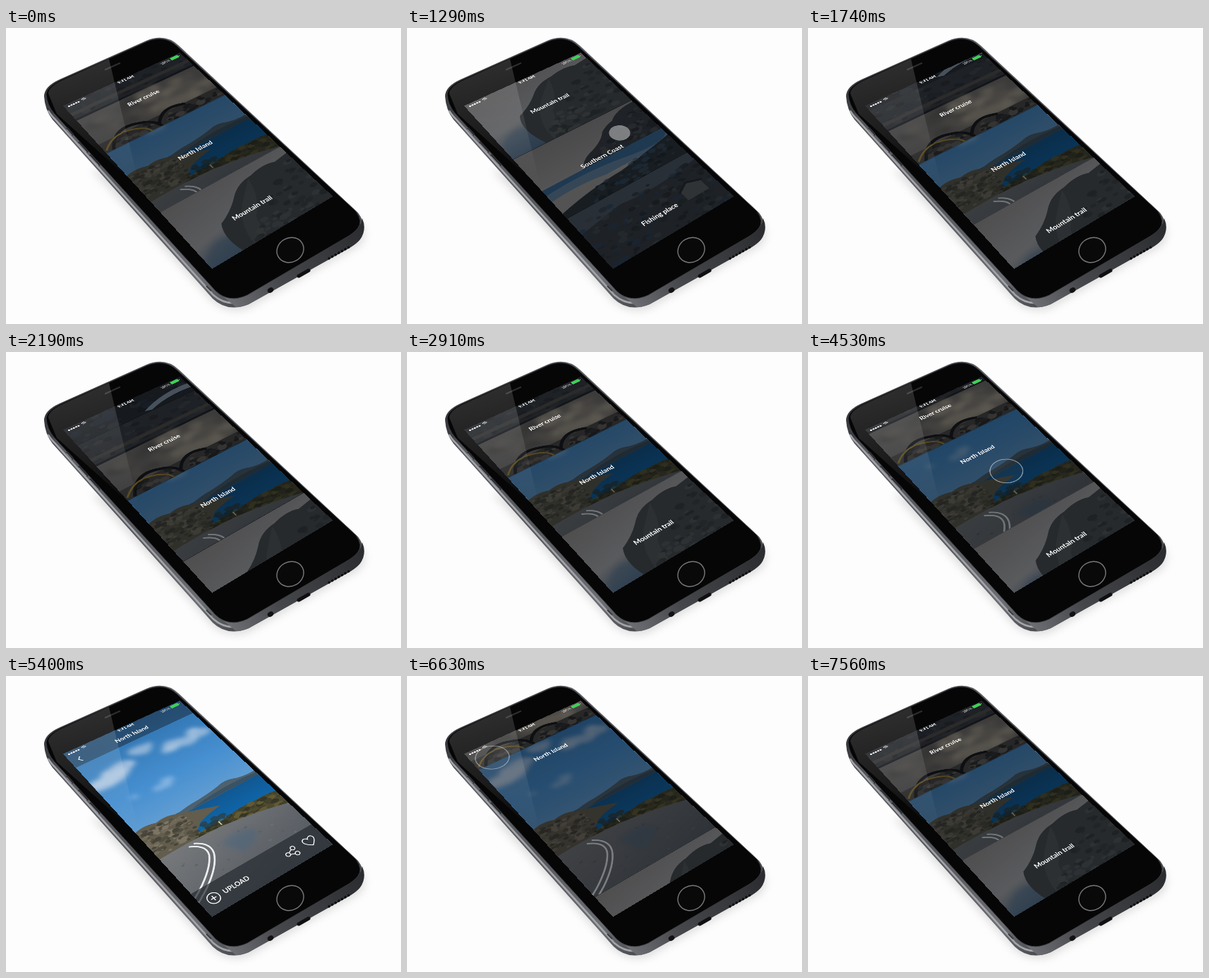
An HTML page that plays this animation: 560x420 px, repeating every 7.59 s.

```html
<!DOCTYPE html>
<html lang="en">
<head>
<meta charset="utf-8">
<title>Travel list</title>
<style>
html, body { margin: 0; width: 100%; height: 100%; overflow: hidden; background: #fdfdfd; }
#stage { position: relative; width: 560px; height: 420px; overflow: hidden; }
#stage > svg { position: absolute; left: 0; top: 0; }
#screen { position: absolute; left: 0; top: 0; width: 375px; height: 667px; overflow: hidden; background: #16191c; transform-origin: 0 0; }
#screen > svg { display: block; }
text { font-family: Lato, "Open Sans", sans-serif; fill: #fff; }
.label { font-weight: 700; font-size: 19px; text-anchor: middle; }
</style>
</head>
<body>
<div id="stage">
  <svg width="560" height="420" viewBox="0 0 560 420">
    <defs>
      <linearGradient id="rim" x1="55" y1="100" x2="320" y2="395" gradientUnits="userSpaceOnUse">
        <stop offset="0" stop-color="#38393d"/><stop offset=".15" stop-color="#5c5e63"/>
        <stop offset=".5" stop-color="#56585c"/><stop offset=".85" stop-color="#6b6d72"/><stop offset="1" stop-color="#4c4e52"/>
      </linearGradient>
      <linearGradient id="foot" x1="320" y1="395" x2="508" y2="285" gradientUnits="userSpaceOnUse">
        <stop offset="0" stop-color="#6c6e73"/><stop offset=".35" stop-color="#45474b"/><stop offset="1" stop-color="#2b2c2f"/>
      </linearGradient>
      <filter id="soft" x="-20%" y="-20%" width="140%" height="140%"><feGaussianBlur stdDeviation="6"/></filter>
    </defs>
    <rect width="560" height="420" fill="#fdfdfd"/>
    <path d="M120 200 L292 388 Q312 406 342 399 L500 310 Q516 296 503 275 Z" fill="#999" opacity=".3" filter="url(#soft)"/>
    <path d="M54 97 Q54 83 76 73 L199 18 Q226 7 245 25 L499 262 Q512 279 504 297 Q499 305 487 312 L344 392 Q314 404 293 384 L66 130 Q55 116 54 97 Z" fill="url(#rim)"/>
    <path d="M60 117 Q62 122 69 129 L294 379 Q313 396 340 387" fill="none" stroke="#a2a4a9" stroke-width="2.6"/>
    <path d="M297 372 Q318 386 344 376 L492 290 Q504 282 505 270 Q512 286 502 300 Q497 306 487 312 L344 392 Q334 396 326 396 Z" fill="url(#foot)"/>
    <path d="M57 94 Q57 84 77 74 L200 19 Q225 9 243 26 L496 260 Q507 275 498 285 Q494 290 486 295 L342 379 Q316 391 297 373 L68 121 Q58 109 57 94 Z" fill="#060607" stroke="#3c3d41" stroke-width=".8"/>
    <path d="M58 112 L66 121 M284 366 L291 373" stroke="#3a3b3f" stroke-width="2"/>
    <path d="M87 143 L94 151 M104 163 L115 175 M120 181 L132 194" stroke="#303136" stroke-width="3.6" stroke-linecap="round"/>
    <path d="M86 144 L93 152 M103 164 L114 176 M119 182 L131 195" stroke="#a4a6aa" stroke-width="1" stroke-linecap="round"/>
    <path d="M141 59 L161 50" stroke="#2d2d30" stroke-width="2.4" stroke-linecap="round"/>
    <ellipse cx="403" cy="315" rx="19.500" ry="17.200" transform="rotate(-28 403 315)" fill="#090909" stroke="#77787b" stroke-width="1.4"/>
    <ellipse cx="375" cy="372" rx="4.500" ry="3.500" transform="rotate(-30 375 372)" fill="#121214"/>
    <path d="M415 352 L429 344" stroke="#101012" stroke-width="5" stroke-linecap="round"/>
    <path d="M458 327 L486 311" stroke="#0c0c0d" stroke-width="3.4" stroke-linecap="round" stroke-dasharray=".1 5.2"/>
  </svg>

  <div id="screen">
    <svg width="375" height="667" viewBox="0 0 375 667">
      <defs>
        <linearGradient id="sky" x1="0" y1="0" x2="0" y2="1">
          <stop offset="0" stop-color="#2f72ae"/><stop offset=".5" stop-color="#468fd0"/><stop offset="1" stop-color="#78a9d4"/>
        </linearGradient>
        <linearGradient id="sea" x1="0" y1="0" x2="0" y2="1">
          <stop offset="0" stop-color="#12568f"/><stop offset="1" stop-color="#0d6ab0"/>
        </linearGradient>
        <linearGradient id="road" x1="0" y1="0" x2=".5" y2="1">
          <stop offset="0" stop-color="#77797b"/><stop offset="1" stop-color="#565b62"/>
        </linearGradient>
        <linearGradient id="fog" x1="0" y1="0" x2=".3" y2="1">
          <stop offset="0" stop-color="#8d8a88"/><stop offset=".55" stop-color="#a0a1a2"/><stop offset="1" stop-color="#41607c"/>
        </linearGradient>
        <linearGradient id="dusk" x1="0" y1="0" x2="0" y2="1">
          <stop offset="0" stop-color="#848180"/><stop offset="1" stop-color="#a7a3a1"/>
        </linearGradient>
        <filter id="blur" x="-30%" y="-30%" width="160%" height="160%"><feGaussianBlur stdDeviation="8"/></filter>
      </defs>
      <g id="list"></g>
      <g id="bars">
        <rect width="375" height="64" fill="#1d2d3c" opacity=".55"/>
        <path d="M30 33 L22 42 L30 51" fill="none" stroke="#fff" stroke-width="2.400"/>
        <g id="tools">
          <rect y="583" width="375" height="84" fill="#262b31" opacity=".72"/>
          <g fill="none" stroke="#fff" stroke-width="2.400">
            <circle cx="36" cy="625" r="16"/>
            <path d="M28 625 H44 M36 617 V633"/>
            <circle cx="263" cy="626" r="6"/><circle cx="285" cy="616" r="6"/><circle cx="285" cy="636" r="6"/>
            <path d="M268 623 L279 618 M268 629 L279 634"/>
            <path d="M334 639 C318 627 316 620 318 615 C322 607 331 609 334 616 C337 609 346 607 350 615 C352 620 350 627 334 639 Z"/>
          </g>
          <text x="65" y="631" font-size="18.500" font-weight="700">UPLOAD</text>
        </g>
      </g>
      <text id="title" class="label" x="189">North Island</text>
      <g id="status">
        <g fill="#fff" id="dots"></g>
        <path d="M51 8 q7 -6 14 0 M54 11.500 q4 -3 8 0" fill="none" stroke="#fff" stroke-width="1.800"/>
        <text x="190" y="12" font-size="13" font-weight="700" text-anchor="middle">9:41 AM</text>
        <text x="334" y="14" font-size="12" text-anchor="end">100%</text>
        <rect x="338" y="4" width="25" height="10" rx="2" fill="#39d353" stroke="#7be08b" stroke-width=".8"/>
        <rect x="365" y="7" width="2" height="4" fill="#7be08b"/>
      </g>
      <circle id="touch" fill="#fff" stroke="#fff" stroke-width="2.500"/>
    </svg>
  </div>

  <svg width="560" height="420" viewBox="0 0 560 420">
    <defs>
      <linearGradient id="glare" x1="120" y1="50" x2="170" y2="230" gradientUnits="userSpaceOnUse">
        <stop offset="0" stop-color="#fff" stop-opacity=".16"/><stop offset=".5" stop-color="#fff" stop-opacity=".09"/>
        <stop offset="1" stop-color="#fff" stop-opacity="0"/>
      </linearGradient>
    </defs>
    <path d="M60 93 Q60 84 78 75 L146 44 L190 228 L72 122 Z" fill="url(#glare)"/>
  </svg>
</div>

<script>
const LOOP = 7590, W = 375, H = 667, ROW = 240, TOP = 213.5, DIM = .53;
const $ = id => document.getElementById(id);
const clamp = x => Math.max(0, Math.min(1, x));
const span = (t, a, b) => clamp((t - a) / (b - a));
const mix = (a, b, p) => a + (b - a) * p;
const easeIn = x => x * x;
const easeOut = x => 1 - (1 - x) * (1 - x);
const easeOutCubic = x => 1 - (1 - x) ** 3;
const easeInOut = x => x < .5 ? 2 * x * x : 1 - 2 * (1 - x) * (1 - x);

// Map the flat screen onto the tilted phone.
function project(el, [x0, y0], [x1, y1], [x2, y2], [x3, y3]) {
  const ax = x1 - x2, bx = x3 - x2, sx = x0 - x1 + x2 - x3;
  const ay = y1 - y2, by = y3 - y2, sy = y0 - y1 + y2 - y3;
  const det = ax * by - bx * ay;
  const g = (sx * by - bx * sy) / det, h = (ax * sy - sx * ay) / det;
  const m = [
    (x1 - x0 + g * x1) / W, (y1 - y0 + g * y1) / W, 0, g / W,
    (x3 - x0 + h * x3) / H, (y3 - y0 + h * y3) / H, 0, h / H,
    0, 0, 1, 0, x0, y0, 0, 1];
  el.style.transform = `matrix3d(${m.map(v => v.toFixed(9))})`;
}
project($('screen'), [81, 110.5], [246.5, 35], [463.5, 239], [292, 342]);

let seed = 7;
const rnd = () => (seed = (seed * 16807) % 2147483647) / 2147483647;

// Small flat blots scattered between two edges, for foliage and rock.
function blots(n, x0, x1, top, bottom, colors, size) {
  let s = '';
  for (let i = 0; i < n; i++) {
    const x = mix(x0, x1, rnd()), y = mix(top(x), bottom(x), rnd()), r = size * (.5 + rnd());
    s += `<ellipse cx="${x.toFixed(1)}" cy="${y.toFixed(1)}" rx="${(r * 1.7).toFixed(1)}" ry="${r.toFixed(1)}" fill="${colors[i % colors.length]}"/>`;
  }
  return `<g opacity=".65">${s}</g>`;
}
const flat = y => () => y;
const shape = (d, fill, more = '') => `<path d="${d}" fill="${fill}" ${more}/>`;
const rect = (x, y, w, h, fill, more = '') => `<rect x="${x}" y="${y}" width="${w}" height="${h}" fill="${fill}" ${more}/>`;

const coast = () =>
  rect(0, 0, W, 460, 'url(#sky)') +
  '<g filter="url(#blur)">' +
  blots(18, 5, 115, x => 150 - x * .3, x => 185 - x * .45, ['#e6e9f0', '#c3d2e6'], 14) +
  blots(14, 225, 365, flat(118), flat(150), ['#dce4ef', '#b9cde4'], 12) +
  blots(7, 130, 230, flat(92), flat(115), ['#b9cde4'], 9) +
  blots(8, 20, 190, flat(232), flat(262), ['#a4c6e8'], 7) + '</g>' +
  rect(0, 352, W, 110, 'url(#sea)') +
  shape('M112 356 Q150 346 190 345 Q235 341 265 334 Q290 326 316 338 Q345 347 375 344 V362 L112 364 Z', '#4d616e') +
  shape('M160 362 Q260 340 375 352 V362 Z', '#3a5262') +
  shape('M0 346 Q30 336 60 348 Q92 340 120 354 Q165 370 226 394 Q180 400 150 412 L128 430 L140 455 H0 Z', '#625d4d') +
  blots(130, 0, 130, x => 352 + x * .07, flat(442), ['#3a3830', '#787060', '#4b473a', '#8b8372'], 4) +
  shape('M105 448 Q150 430 200 440 Q260 426 310 432 Q345 430 375 436 V500 L150 466 Z', '#4d4a30') +
  blots(100, 110, W, flat(436), x => 450 + (x - 110) * .15, ['#2b2c20', '#6d6336', '#3d3d28'], 5) +
  blots(14, 150, 215, flat(418), flat(442), ['#2a2f26', '#343a30'], 5) +
  shape('M0 452 Q90 446 190 454 Q290 466 375 490 V667 H0 Z', 'url(#road)') +
  shape('M150 500 Q210 480 250 510 Q240 545 180 555 Z', '#3d6284', 'opacity=".35" filter="url(#blur)"') +
  blots(40, 0, W, flat(490), flat(660), ['#6f7479', '#575c62'], 2) +
  '<g fill="none" stroke="#eceef0" stroke-width="4.500">' +
  '<path d="M96 459 Q132 480 118 514 Q100 552 36 594 L-12 622"/>' +
  '<path d="M80 461 Q120 481 105 512 Q84 548 20 588 L-12 606"/></g>' +
  shape('M188 450 v-14 h3 v14 Z', '#d2d4d2');

const river = () =>
  rect(0, 0, W, ROW, '#6b6863') +
  rect(0, 0, W, 92, '#34373b') +
  blots(50, 0, W, flat(8), flat(84), ['#25272a', '#45484b', '#2b3138'], 6) +
  rect(0, 62, W, 12, '#4a4945') +
  rect(0, 88, W, 7, '#1e2023') +
  '<g filter="url(#blur)">' +
  blots(16, 10, 190, flat(108), flat(190), ['#7d776d', '#4f4d4a', '#5c5a56'], 13) +
  blots(26, 190, W, flat(104), flat(195), ['#b3a893', '#8d8577', '#c0b59f'], 14) + '</g>' +
  rect(0, 202, W, 38, '#45423e') +
  '<g fill="none"><path d="M22 240 Q60 170 125 196 Q165 208 172 244 M165 235 Q200 176 268 206" stroke="#161718" stroke-width="9"/>' +
  '<path d="M5 232 Q50 186 105 208 Q135 220 140 242" stroke="#9c7f2c" stroke-width="5"/></g>' +
  blots(40, 0, W, flat(208), flat(238), ['#232425', '#6c6860', '#18191a'], 6);

const trail = () =>
  rect(0, 0, W, ROW, 'url(#fog)') +
  shape('M0 190 Q50 130 110 170 L140 240 H0 Z', '#526f8c', 'opacity=".6" filter="url(#blur)"') +
  shape('M100 240 Q70 165 98 118 Q140 100 172 70 Q205 38 250 36 Q300 22 330 35 L375 28 V240 Z', '#43484a') +
  shape('M240 40 Q225 110 180 150 Q160 205 170 240 H125 Q120 160 175 100 Z', '#555a59', 'opacity=".6"') +
  blots(80, 140, W, x => 225 - (x - 105) * .72, flat(240), ['#2d3233', '#585d5b', '#343a3c'], 6);

const cliff = () =>
  rect(0, 0, W, ROW, 'url(#dusk)') +
  shape('M120 140 Q136 104 180 92 Q222 76 240 52 Q262 38 285 34 Q312 8 375 6 V160 H120 Z', '#353a3d') +
  blots(70, 160, W, x => 120 - (x - 160) * .45, flat(140), ['#22272a', '#4a4f51', '#2d3337'], 6) +
  rect(0, 132, W, 46, '#36648c') +
  shape('M0 152 Q120 140 235 160 T375 150 V180 H0 Z', '#5e7d97') +
  shape('M0 176 Q90 165 170 182 L260 196 L150 222 H0 Z', '#96938f') +
  shape('M0 222 Q100 196 200 192 Q300 176 375 160 V240 H0 Z', '#293035') +
  blots(50, 90, W, x => 212 - x * .12, flat(240), ['#1b2125', '#3d4c58', '#2c4d6b'], 5);

const fishing = () =>
  rect(0, 0, W, ROW, '#343a3e') +
  shape('M0 0 H375 V30 Q240 55 130 40 L0 62 Z', '#46515a') +
  blots(220, 0, W, flat(28), flat(238), ['#1f2528', '#2f363a', '#414a50', '#262d2f', '#28405a'], 5) +
  shape('M275 96 L305 80 L342 92 V130 H275 Z', '#54585a') +
  shape('M268 98 L305 76 L350 92 L344 97 L305 83 L272 102 Z', '#24282a');

const ridge = () =>
  rect(0, 0, W, ROW, '#25292d') +
  blots(60, 0, W, flat(90), flat(235), ['#1d2124', '#363c41', '#273544'], 8) +
  shape('M215 232 Q290 196 375 204 V222 Q300 214 235 238 Z', '#7f8fa0');

const rows = [
  { at: -2, art: ridge, name: '' },
  { at: -1, art: river, name: 'River cruise' },
  { at: 1, art: trail, name: 'Mountain trail' },
  { at: 2, art: cliff, name: 'Southern Coast' },
  { at: 3, art: fishing, name: 'Fishing place' },
  { at: 0, art: coast, name: '' }
];
$('list').innerHTML = rows.map((r, i) =>
  `<svg id="row${i}" width="${W}" height="${ROW}" overflow="hidden"><g>${r.art()}</g>` +
  `<rect width="${W}" height="${H}" fill="#05080c" opacity=".46"/>` +
  rect(0, 0, W, 1, '#0b0d10') +
  `<text class="label" x="189" y="130">${r.name}</text></svg>`).join('');
rows.forEach((r, i) => {
  r.el = $('row' + i);
  [r.photo, r.shade] = r.el.children;
});
$('dots').innerHTML = [...Array(5)].map((_, i) => `<circle cx="${12 + i * 7.2}" cy="10" r="2.8"/>`).join('');

function scrollAt(t) {
  if (t < 860) return 240 * easeIn(span(t, 560, 860));
  if (t < 1200) return mix(240, 480, easeOut(span(t, 860, 1160)));
  if (t < 1500) return 480 - 278 * easeIn(span(t, 1200, 1500));
  if (t < 2050) return mix(202, -102, easeOutCubic(span(t, 1500, 2050)));
  return mix(-102, 0, easeInOut(span(t, 2050, 3000)));
}

// Finger marks: press, hold, then either fade or widen into a ring.
const taps = [
  { on: 480, off: 860, x: 275, y: t => 480 - scrollAt(t) },
  { on: 1100, off: 1500, x: 275, y: t => 295 + 480 - scrollAt(t) },
  { on: 3790, off: 4200, x: 215, y: () => 340, ring: true },
  { on: 5790, off: 6240, x: 53, y: () => 54, ring: true }
];

function drawTouch(t) {
  const tap = taps.find(k => t >= k.on && t < k.off + (k.ring ? 650 : 120));
  const el = $('touch');
  el.setAttribute('visibility', tap ? 'visible' : 'hidden');
  if (!tap) return;
  const press = span(t, tap.on, tap.on + 120);
  const out = span(t, tap.off, tap.off + (tap.ring ? 650 : 120));
  const fill = tap.ring ? .42 * press * (1 - span(out, 0, .5)) : .42 * press * (1 - out);
  el.setAttribute('cx', tap.x);
  el.setAttribute('cy', tap.y(Math.min(t, tap.off)));
  el.setAttribute('r', mix(36, 28, press) + (tap.ring ? 19 * easeOut(out) : 0));
  el.setAttribute('fill-opacity', fill + (tap.ring ? .06 * (1 - out) * press : 0));
  el.setAttribute('stroke-opacity', tap.ring && out > 0 ? 1 - out : 0);
}

function draw(t) {
  const scroll = scrollAt(t);
  const open = easeInOut(span(t, 4260, 5060)) * (1 - easeInOut(span(t, 6300, 7100)));
  const bars = span(t, 4860, 5280) * (1 - span(t, 6240, 6480));

  for (const r of rows) {
    let y = TOP + r.at * ROW - scroll;
    if (r.at < 0) y -= TOP * open;
    if (r.at > 0) y += (H - TOP - ROW) * open;
    if (r.at === 0) {
      y = mix(y, 0, open);
      r.el.setAttribute('height', mix(ROW, H, open));
      r.photo.setAttribute('transform', `translate(0 ${mix(-251, 0, open)})`);
      r.shade.setAttribute('opacity', DIM * (1 - open ** 6));
    }
    r.el.setAttribute('y', y);
  }
  const title = $('title');
  title.setAttribute('y', mix(TOP + ROW / 2 - scroll + 10, 46, open ** .82));
  $('bars').setAttribute('opacity', bars);
  $('tools').setAttribute('transform', `translate(0 ${84 * (1 - easeOut(bars))})`);
  drawTouch(t);
}

function frame() {
  draw(performance.now() % LOOP);
  requestAnimationFrame(frame);
}
frame();
</script>
</body>
</html>
```
